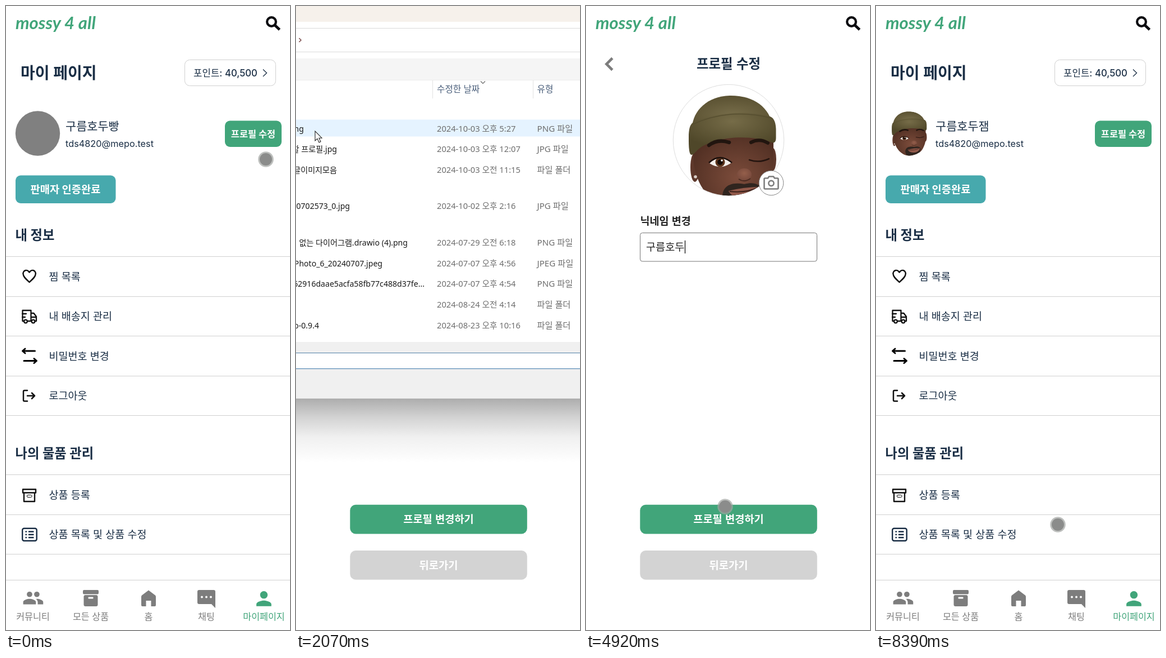
These frames come from a looping animation (506x1107 px, 8430 ms). An HTML page:

```html
<!DOCTYPE html>
<html lang="ko">
<head>
<meta charset="utf-8">
<title>Profile edit</title>
<style>
html, body { margin: 0; width: 100%; height: 100%; overflow: hidden; background: #fff; }
svg { display: block; width: 100%; height: 100%; font-family: Inter, 'Noto Sans CJK KR', 'Noto Sans CJK', sans-serif; }
.cjk { font-family: 'Noto Sans CJK KR', 'Noto Sans CJK', sans-serif; }
.win { font-family: 'Noto Sans', 'Noto Sans CJK KR', 'Noto Sans CJK', sans-serif; }
text { white-space: pre; }
</style>
</head>
<body>
<svg id="stage" viewBox="0 0 506 1107" xmlns="http://www.w3.org/2000/svg"></svg>
<script>
const LOOP = 8430;
const NAVY = '#1a2e45', GREEN = '#41a57a', GRAY = '#7d7d7d', INK = '#111', LINE = '#d0d0d0';
const OLD_NAME = '구름호두빵', STEM = '구름호두', NEW_NAME = '구름호두잼';

const text = (x, y, size, str, fill = NAVY, weight = 400, attrs = '') =>
  `<text x="${x}" y="${y}" font-size="${size}" fill="${fill}" font-weight="${weight}" ${attrs}>${str}</text>`;
const mid = (x, y, size, str, fill, weight) => text(x, y, size, str, fill, weight, 'text-anchor="middle"');
const box = (x, y, w, h, r, fill, stroke = 'none') =>
  `<rect x="${x}" y="${y}" width="${w}" height="${h}" rx="${r}" fill="${fill}" stroke="${stroke}"/>`;
const hline = (y, color = LINE) => `<path d="M0 ${y}H506" stroke="${color}"/>`;
const stroke = (d, color, width, attrs = '') =>
  `<path d="${d}" fill="none" stroke="${color}" stroke-width="${width}" ${attrs}/>`;
const solid = (d, color, attrs = '') => `<path d="${d}" fill="${color}" ${attrs}/>`;
const disc = (x, y, r, fill, attrs = '') => `<circle cx="${x}" cy="${y}" r="${r}" fill="${fill}" ${attrs}/>`;
const oval = (x, y, rx, ry, fill) => `<ellipse cx="${x}" cy="${y}" rx="${rx}" ry="${ry}" fill="${fill}"/>`;
const at = (x, y, scale, body) => `<g transform="translate(${x} ${y}) scale(${scale})">${body}</g>`;
const ROUND = 'stroke-linecap="round" stroke-linejoin="round"';

// Avatar drawn around the large circle centred on 254,238.
const avatar = `
  ${oval(194, 286, 8, 26, '#5e382b')}${oval(333, 272, 6, 20, '#5e382b')}
  ${solid('M190 246L192 280C196 304 204 322 218 336C234 351 250 356 268 356C292 356 312 342 322 322C331 306 334 290 334 278V236Q260 212 190 246Z', 'url(#skin)')}
  ${disc(195, 303, 2.8, '#d9cfc8')}
  ${solid('M189 216C190 185 218 159 258 159C300 159 327 180 333 214Z', 'url(#dome)')}
  ${solid('M183 234C183 213 187 207 196 204C240 187 290 186 328 196C336 199 338 208 338.500 218V234C338.500 243 334 244 328 241C300 231 245 228 207 249C197 255 193 264 188 264C183 264 183 246 183 234Z', 'url(#band)')}
  ${stroke('M190 210Q255 180 331 199', '#544c2e', 1.2)}
  ${stroke('M219 247Q235 235 255 242', '#21150f', 6.5, ROUND)}
  ${stroke('M294 242Q309 234 324 243', '#21150f', 6, ROUND)}
  ${solid('M220 279Q238 262 259 278Q240 292 220 279Z', '#f2eeea')}
  ${disc(239, 277, 8.5, '#5a321a')}${disc(239, 277, 5, '#140b08')}${disc(242, 274, 1.8, '#fff')}
  ${stroke('M219 278Q238 260 260 278', '#1c100c', 2.5)}
  ${stroke('M291 273Q309 279 326 271', '#24140f', 2.5, ROUND)}
  ${oval(282, 299, 13, 11, 'url(#nose)')}
  ${stroke('M272 307Q282 314 293 306', '#4a2a20', 2)}
  ${solid('M243 337C244 318 260 312 282 316C298 312 308 315 312 324L306 343C292 360 260 360 247 350Z', '#30251f')}
  ${solid('M254 328Q282 321 309 321Q304 340 282 341Q260 341 254 328Z', '#92594a')}
  ${stroke('M256 329Q286 332 307 322', '#3b2019', 2)}`;

const person = 'M12 12c2.21 0 4-1.79 4-4s-1.79-4-4-4-4 1.79-4 4 1.79 4 4 4zm0 2c-2.67 0-8 1.34-8 4v2h16v-2c0-2.66-5.33-4-8-4z';
const people = 'M16 11a3 3 0 1 0 0-6a3 3 0 0 0 0 6zM8 11a3 3 0 1 0 0-6a3 3 0 0 0 0 6zM8 13c-2.33 0-7 1.17-7 3.5V19h14v-2.5c0-2.33-4.67-3.5-7-3.5zM16 13l-.97.05c1.16.84 1.97 1.97 1.97 3.45V19h6v-2.5c0-2.33-4.67-3.5-7-3.5z';

const header = `
  ${text(17, 41, 31, 'mossy 4 all', GREEN, 700, 'font-style="italic" font-family="Lato, sans-serif"')}
  ${disc(473, 28, 7.9, 'none', 'stroke="#0b0b10" stroke-width="4.200"')}
  ${stroke('M479 34L487.500 42', '#0b0b10', 4.8)}`;

const rowIcons = `
  ${at(27, 465.5, 1.22, stroke('M12 20C6.500 15 3 12 3 8.500A4.500 4.500 0 0 1 12 6.300A4.500 4.500 0 0 1 21 8.500C21 12 17.500 15 12 20Z', INK, 2))}
  ${stroke('M32 559H29.500V540H44.500V559H38M44.500 545H49.500L54 551V559H52M44.500 552H54M29 546H36M29 552H34', INK, 2.3, ROUND)}
  ${disc(35, 559.5, 2.8, '#fff', `stroke="${INK}" stroke-width="2.2"`)}${disc(48.5, 559.5, 2.8, '#fff', `stroke="${INK}" stroke-width="2.2"`)}
  ${stroke('M51.500 612H30M34 608L29.500 612L34 616M32 629.500H54M50 625.500L54.500 629.500L50 633.500', '#000', 3, ROUND)}
  ${stroke('M38 682H33Q31 682 31 684V699Q31 701 33 701H38M38 691.500H51M46 686.500L51 691.500L46 696.500', INK, 2.5, ROUND)}
  ${stroke('M30 857.500H53V863.500H30ZM32 864V879H51V864', INK, 2.4, ROUND)}
  ${box(37.5, 867.5, 8.5, 4, 1.5, 'none', INK)}
  <rect x="29.2" y="926.700" width="25.500" height="22" rx="3" fill="none" stroke="${NAVY}" stroke-width="2.400"/>
  ${stroke('M34.500 932.500H37M40 932.500H49.500M34.500 937.700H37M40 937.700H49.500M34.500 943H37M40 943H49.500', NAVY, 2.4)}`;

const rows = [[486.5, '찜 목록'], [557, '내 배송지 관리'], [627.5, '비밀번호 변경'], [698, '로그아웃'],
  [873.5, '상품 등록'], [944, '상품 목록 및 상품 수정']];
const tabs = [[48, '커뮤니티'], [151, '모든 상품'], [254, '홈'], [357, '채팅'], [459.5, '마이페이지']];

const myPage = `
  ${text(26, 129, 28, '마이 페이지', NAVY, 700)}
  ${box(318.5, 95.5, 162, 46, 9, '#fff', LINE)}
  ${text(334, 125, 16.8, '포인트: 40,500', NAVY, 500)}
  ${stroke('M458 112.500L464.500 118.700L458 125', NAVY, 1.3)}
  ${disc(56.5, 226, 39.7, '#808080', 'id="blank"')}
  <g id="thumb" clip-path="url(#thumbClip)">${at(56.5, 218.8, 0.4, `<g transform="translate(-254 -238)">${avatar}</g>`)}</g>
  ${text(106, 220.5, 20.8, '', NAVY, 500, 'id="name"')}
  ${text(106, 250, 16.3, 'tds4820@mepo.test', NAVY)}
  ${box(390, 203.5, 101, 46.500, 9, GREEN)}${mid(440.5, 233, 16.4, '프로필 수정', '#fff', 700)}
  ${box(17, 300.5, 178.500, 49.500, 9, '#47a9ad')}${mid(106, 332, 18.7, '판매자 인증완료', '#fff', 700)}
  ${text(16.5, 415, 23.3, '내 정보', NAVY, 700)}
  ${text(16.5, 802, 23.3, '나의 물품 관리', NAVY, 700)}
  ${[444.5, 515.5, 585.5, 656.5, 726.5, 831.5, 902.5, 972.5, 1018.5].map(y => hline(y)).join('')}
  ${rows.map(([y, s]) => text(76.5, y, 18.5, s)).join('')}
  ${rowIcons}
  ${tabs.map(([x, s], i) => mid(x, 1089, 16.2, s, i == 4 ? GREEN : GRAY, i == 4 ? 500 : 400)).join('')}
  ${at(29, 1030.8, 1.62, solid(people, GRAY))}
  ${box(137, 1036, 28, 7.500, 2, GRAY)}${box(138.5, 1045, 25, 20, 3, GRAY)}${box(146.5, 1048.5, 9, 3, 1, '#fff')}
  ${solid('M254 1036.500L266 1045.500Q267 1046.500 267 1048V1063Q267 1065 265 1065H258.500V1055H249.500V1065H243Q241 1065 241 1063V1048Q241 1046.500 242 1045.500Z', GRAY)}
  ${solid('M344 1036H370Q373 1036 373 1039V1068L366 1061H344Q341 1061 341 1058V1039Q341 1036 344 1036Z', GRAY)}
  ${[349, 357, 365].map(x => disc(x, 1048.5, 1.9, '#fff')).join('')}
  ${at(439.4, 1031.3, 1.67, solid(person, GREEN))}`;

const editPage = `
  ${stroke('M47 92.500L36.500 103L47 113.500', GRAY, 4.6)}
  ${mid(254, 111, 23.4, '프로필 수정', NAVY, 700)}
  ${disc(254, 238, 98.7, '#d3d3d3', 'id="circle" stroke="#ddd"')}
  <g id="photo" clip-path="url(#photoClip)">${avatar}</g>
  ${disc(330, 314, 21.8, '#fff', 'stroke="#858585"')}
  ${stroke('M319 305.500H324L326 302.500H334L336 305.500H341Q342.500 305.500 342.500 307V323Q342.500 324.500 341 324.500H319Q317.500 324.500 317.500 323V307Q317.500 305.500 319 305.500Z', GRAY, 2.6, ROUND)}
  ${disc(330, 314.5, 4.6, 'none', `stroke="${GRAY}" stroke-width="2.600"`)}
  ${text(96.5, 388, 18.5, '닉네임 변경', '#222', 700)}
  ${box(96.5, 402.5, 315, 50.500, 4, '#fff', '#767676')}
  ${text(107, 434, 18.6, '', '#222', 400, 'id="field"')}
  ${stroke('M176 438.500H191.500', '#222', 1.2, 'id="under"')}
  ${stroke('M0 416V439', '#000', 1.2, 'id="caret"')}
  ${box(96.3, 884.700, 315.500, 51.700, 10, GREEN)}${mid(254, 917, 18.7, '프로필 변경하기', '#fff', 700)}
  ${box(96.3, 966, 315.500, 51.700, 10, '#d3d3d3')}${mid(254, 998.5, 18.7, '뒤로가기', '#fff', 700)}`;

// Row centre, right edge of the name, name, date, type.
const files = [
  [218, 14, '복사.png', '2024-10-03 오후 5:27', 'PNG 파일'],
  [254, 73, '할 프로필.jpg', '2024-10-03 오후 12:07', 'JPG 파일'],
  [291, 73, '글이미지모음', '2024-10-03 오전 11:15', '파일 폴더'],
  [355, 96, '50702573_0.jpg', '2024-10-02 오후 2:16', 'JPG 파일'],
  [420, 199, '없는 다이어그램.drawio (4).png', '2024-07-29 오전 6:18', 'PNG 파일'],
  [457, 154, 'ePhoto_6_20240707.jpeg', '2024-07-07 오후 4:56', 'JPEG 파일'],
  [493, 229, 'f62916daae5acfa58fb77c488d37fe...', '2024-07-07 오후 4:54', 'PNG 파일'],
  [530, 0, '', '2024-08-24 오전 4:14', '파일 폴더'],
  [567, 41, 'ro-0.9.4', '2024-08-23 오후 10:16', '파일 폴더']];
const fileRow = ([y, right, name, date, type]) =>
  text(right, y + 5, 14.1, name, '#1a1a1a', 400, 'text-anchor="end"') +
  text(251, y + 5, 14.7, date, '#6d6d6d') + text(429.5, y + 5, 15.2, type, '#6d6d6d');
const wide = (y, h, fill) => box(-300, y, 1200, h, 0, fill);
const rule = (y, color) => `<path d="M-300 ${y}H900" stroke="${color}"/>`;

const dialog = `
  ${wide(-46, 40, 'url(#shadeUp)')}${wide(697, 113, 'url(#shadeDown)')}
  ${wide(-6, 703, '#fff')}${rule(-6, '#b5b5b5')}
  ${wide(-5.5, 33.500, '#f6f1eb')}${rule(39.5, '#dadada')}${rule(81.5, '#dadada')}
  ${wide(93, 38, '#f5f5f5')}${rule(131.5, '#ececec')}
  ${stroke('M243.500 132V164M422.500 132V164', '#e2e2e2', 1)}
  ${stroke('M329 133.500L333 137.500L337 133.500', '#666', 1.1)}
  ${text(251, 153, 15.7, '수정한 날짜', '#4c607c')}${text(429.5, 153, 15.7, '유형', '#4c607c')}
  <g id="loading">${text(-8, 66, 16, '드', '#3f4e66')}${text(401.5, 198.5, 15.3, '작업 중...', '#707070')}</g>
  <g id="loaded">${stroke('M5.500 57L9 60.500L5.500 64', '#7a4a4a', 1.5)}
    <rect id="pick" x="-300" y="201.500" width="1200" height="30"/>
    ${files.map(fileRow).join('')}</g>
  ${wide(596, 101, '#f0f0f0')}${wide(615, 28, '#fff')}${rule(615.5, '#4f7ea6')}${rule(643.5, '#3d78ab')}
  ${text(35, 634, 14.1, '복사.png', '#222', 400, 'id="picked" text-anchor="end"')}
  ${rule(697, '#a5a5a5')}`;

const stop = (o, a) => `<stop offset="${o}" stop-color="#000" stop-opacity="${a}"/>`;
const glow = (id, cx, cy, from, to) => `<radialGradient id="${id}" cx="${cx}" cy="${cy}" r=".65"><stop stop-color="${from}"/><stop offset="1" stop-color="${to}"/></radialGradient>`;

document.getElementById('stage').innerHTML = `
  <defs>
    <linearGradient id="shadeDown" x2="0" y2="1">${stop(0, .32)}${stop(.3, .17)}${stop(.6, .06)}${stop(1, 0)}</linearGradient>
    <linearGradient id="shadeUp" x2="0" y2="1">${stop(0, 0)}${stop(1, .1)}</linearGradient>
    ${glow('skin', .55, .6, '#7c4c3b', '#4f2e22')}${glow('dome', .5, .6, '#776d4a', '#574e2f')}
    ${glow('band', .5, .2, '#766c48', '#4f4729')}${glow('nose', .5, .4, '#955f4b', '#74473a')}
    <clipPath id="photoClip"><circle cx="254" cy="238" r="98.200"/></clipPath>
    <clipPath id="thumbClip"><circle cx="56.500" cy="226" r="39.700"/></clipPath>
  </defs>
  <rect width="506" height="1107" fill="#fff"/>
  ${header}
  <g id="my">${myPage}</g>
  <g id="edit" class="cjk">${editPage}</g>
  <g id="dialog" class="win">${dialog}</g>
  <g id="pointer">
    <g id="dot">${disc(0, 0, 13.8, '#a2a5a3', 'fill-opacity=".7"')}${disc(0, 0, 11, '#8b8c8b')}</g>
    <path id="arrow" d="M0 0V17L4 13.300L7 20L10 18.700L7 12.200H12Z" fill="#fff" stroke="#222" stroke-width="1.100"/>
  </g>`;

const el = {};
document.querySelectorAll('#stage [id]').forEach(n => el[n.id] = n);
const show = (node, on) => node.setAttribute('display', on ? 'inline' : 'none');
const clamp = v => Math.min(1, Math.max(0, v));
const within = (t, spans) => spans.some(([a, b]) => t >= a && t < b);

// Pointer keys: time, x, y.
const path = [[0, 463, 272], [60, 463, 272], [130, 408, 257], [230, 296, 240], [320, 370, 231], [410, 438, 236],
  [860, 438, 236], [950, 233, 345], [1120, 233, 345], [1280, 248, 264.5], [1740, 248, 264.5], [2050, 34, 222],
  [2800, 34, 222], [3180, 337, 456], [3500, 264, 418.5], [4300, 264, 418.5], [4560, 248, 573], [4740, 218, 778],
  [4840, 212, 868], [4920, 248, 888], [5440, 248, 888], [5600, 248, 862], [6600, 248, 862], [6820, 360, 1089],
  [7080, 336, 926], [7260, 336, 926], [7420, 330, 919], [8389, 330, 919], [8390, 324, 920], [LOOP, 324, 920]];

function pointerAt(t) {
  const i = Math.max(1, path.findIndex(k => k[0] > t));
  const [t0, x0, y0] = path[i - 1], [t1, x1, y1] = path[i];
  const p = (t - t0) / (t1 - t0);
  return [x0 + (x1 - x0) * p, y0 + (y1 - y0) * p];
}

function fieldAt(t) {
  if (t < 4530) return OLD_NAME;
  if (t < 6000) return STEM;
  if (t < 6070) return STEM + 'ㅈ';
  if (t < 6140) return STEM + '재';
  return NEW_NAME;
}

function drawDialog(t) {
  const open = clamp((t - 1600) / 300), close = clamp((t - 2390) / 200);
  const scale = 1 - 0.106 * (1 - open) ** 2 - 0.046 * close;
  const picked = t >= 2280;
  show(el.dialog, open > 0 && close < 1);
  el.dialog.setAttribute('opacity', Math.min(1, open * 2.8) * (1 - close));
  el.dialog.setAttribute('transform', `translate(280 290) scale(${scale}) translate(-280 -290)`);
  show(el.loading, t < 1820);
  show(el.loaded, t >= 1820);
  show(el.picked, picked);
  el.pick.setAttribute('fill', picked ? '#c8e6fb' : '#e5f3ff');
  el.pick.setAttribute('stroke', picked ? '#1c4a70' : 'none');
  show(el.pick, t >= 2000);
}

function draw(t) {
  const done = t >= 8090, editing = t >= 610 && !done, hasPhoto = t >= 2390;
  show(el.my, !editing);
  show(el.edit, editing);
  show(el.blank, !done);
  show(el.thumb, done);
  el.name.textContent = done ? NEW_NAME : OLD_NAME;

  el.circle.setAttribute('fill', hasPhoto ? '#fff' : '#d3d3d3');
  show(el.photo, hasPhoto);
  el.field.textContent = fieldAt(t);
  show(el.under, t >= 6000 && t < 7280);
  show(el.caret, within(t, [[3640, 4040], [4530, 5060], [5460, 5860], [6000, 6540], [7040, 7280]]));
  el.caret.setAttribute('transform', `translate(${t >= 4530 && t < 6000 ? 176.5 : 193})`);
  drawDialog(t);

  const [x, y] = pointerAt(t), arrow = t >= 1420 && t < 2390;
  el.pointer.setAttribute('transform', `translate(${x} ${y})`);
  show(el.arrow, arrow);
  show(el.dot, !arrow);
}

const start = performance.now();
function tick() {
  draw((performance.now() - start) % LOOP);
  requestAnimationFrame(tick);
}
tick();
</script>
</body>
</html>
```
